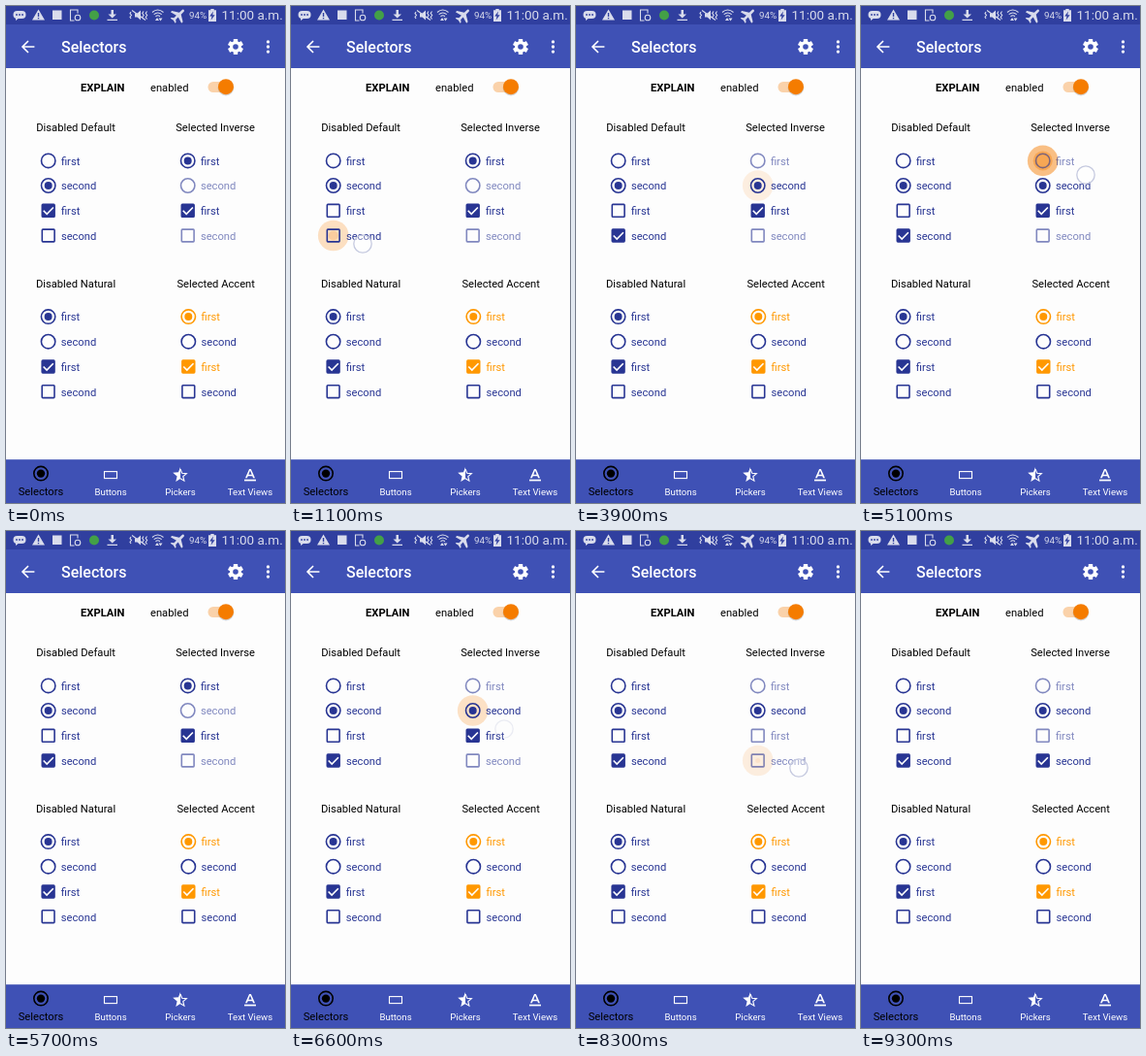
Write an HTML page that moves like this. It is 288 by 512 pixels and loops after 9400 ms.

```html
<!DOCTYPE html>
<html lang="en">
<head>
<meta charset="utf-8">
<title>Selectors</title>
<style>
  html, body { margin: 0; height: 100%; overflow: hidden; background: #fdfdfd; }
  svg { display: block; width: 100vw; height: 100vh; font: 11.2px Roboto, sans-serif; }
  .line { fill: none; stroke: currentColor; stroke-width: 1.6; }
  .thin { stroke-width: 1.1; }
  .solid { fill: currentColor; }
  .mid { text-anchor: middle; }
  .white { color: #fff; fill: #fff; }
  .status { color: #d9dcec; fill: #d9dcec; }
  .tab { font-size: 9.6px; text-anchor: middle; }
</style>
</head>
<body>
<svg viewBox="0 0 288 512">
  <rect width="288" height="512" fill="#fdfdfd"/>
  <rect width="288" height="64" fill="#3f51b5"/>
  <rect width="288" height="19" fill="#303f9f"/>
  <rect y="467.200" width="288" height="44.800" fill="#3f51b5"/>

  <g class="status">
    <rect x="7.500" y="5" width="13" height="8" rx="4"/>
    <path d="M10 12v3l4-3zM33.500 3.500L40 14.500H27z"/>
    <g fill="#303f9f">
      <circle cx="11" cy="9" r=".9"/><circle cx="14" cy="9" r=".9"/><circle cx="17" cy="9" r=".9"/>
      <path d="M32.800 7h1.400v4h-1.400zM32.800 12h1.400v1.300h-1.400z"/>
    </g>
    <rect x="48" y="4.500" width="9.500" height="9.500"/>
    <path class="line thin" d="M74 7.500V4h-7.500v11h4"/>
    <circle class="line thin" cx="74" cy="12" r="2.800"/>
    <circle cx="91" cy="9.500" r="5" fill="#43a047"/>
    <path d="M108.500 4h2.500v4.500h3l-4.300 4-4.200-4h3zM104.500 13.700h10.500v1.300h-10.500z"/>
    <path d="M133 7.500h2.500l3.500-3v10l-3.500-3H133z"/>
    <path class="line thin" d="M130 4.500l14 10M129 6l-1 1.700 1.500 1.800-1.500 1.700 1 1.800M142 5.500l-1.300 2 1.500 2-1.500 2 1.300 2M145.500 5.500l-1.300 2 1.500 2-1.500 2 1.300 2"/>
    <path class="line thin" d="M151 6.500q5.500-5 11.500 0M152.700 8.700q4-3.400 8 0M154.500 10.700q2.200-1.800 4.400 0"/>
    <path d="M154 15l2-3 2 3zM157.500 12.500h4l-2 3z"/>
    <path transform="translate(178 9.500) rotate(45)" d="M-1.300-7q1.300-2 2.600 0v4.500L8 1.500v2L1.300 1.700v3.500L3.500 7v1.200L0 7.300l-3.500.900V7l2.200-1.800V1.700L-8 3.500v-2l6.700-4z"/>
    <text x="189" y="13" font-size="9.800">94%</text>
    <path d="M211.300 3h3.400v1.300h2.300V16h-8V4.300h2.300z"/>
    <path fill="#303f9f" d="M214 5.500l-3.800 5h2.300l-.8 4 3.900-5.200h-2.400z"/>
    <text x="222.500" y="13.800" font-size="13.500">11:00 a.m.</text>
  </g>

  <g class="white">
    <path class="line" d="M29.400 42H17.500M23 36l-6 6 6 6"/>
    <text x="57" y="48" font-size="16" font-weight="500">Selectors</text>
    <g id="gear" transform="translate(237 42)"></g>
    <circle cx="270.500" cy="36.900" r="1.650"/><circle cx="270.500" cy="42" r="1.650"/><circle cx="270.500" cy="47.100" r="1.650"/>
  </g>

  <text x="77" y="88" font-weight="700">EXPLAIN</text>
  <text x="149" y="88">enabled</text>
  <rect x="208.500" y="78" width="25" height="11" rx="5.500" fill="#fad2aa"/>
  <circle cx="227" cy="84.200" r="8.300" fill="#000" opacity=".16"/>
  <circle cx="227" cy="83.200" r="8" fill="#f57c00"/>

  <circle class="line" cx="36" cy="481.600" r="7.200"/>
  <circle cx="36" cy="481.600" r="4.200"/>
  <text class="mid" x="36" y="503.700">Selectors</text>
  <g class="white tab">
    <rect class="line thin" x="101.500" y="479.600" width="13" height="7"/>
    <path class="line thin" d="M180 477l1.700 4.200 4.700.4-3.600 3 1.100 4.500L180 486.700"/>
    <path d="M180 475l-2 5.300-5.800.4 4.400 3.800-1.300 5.500 4.700-2.900z"/>
    <path fill-rule="evenodd" d="M251.100 477h1.800l4.100 9.300h-1.900l-.8-2h-4.600l-.8 2H247zM250.300 482.700h3.400l-1.700-4.200z"/>
    <path d="M246 487.700h12v1.700h-12z"/>
    <text x="108" y="503.700">Buttons</text>
    <text x="180" y="503.700">Pickers</text>
    <text x="252" y="503.700">Text Views</text>
  </g>

  <g id="ripples"></g>
  <g id="controls"></g>
  <g id="touches"></g>
</svg>
<script>
const LOOP = 9400, STEP = 100;
const NAVY = '#283593', ORANGE = '#ff9800';
const ROWS = [159.4, 185, 210.8, 236.5];
const LABELS = ['first', 'second', 'first', 'second'];
const GROUPS = [
  { title: 'Disabled Default', x: 43.7, dy: 0, on: [0, 1, 1, 0] },
  { title: 'Selected Inverse', x: 187.7, dy: 0, on: [1, 0, 1, 0], dim: 0.58 },
  { title: 'Disabled Natural', x: 43.6, dy: 160.7, on: [1, 0, 1, 0] },
  { title: 'Selected Accent', x: 188.3, dy: 160.7, on: [1, 0, 1, 0], accent: ORANGE }
];
const tap = (group, row, press, release, x, y) => ({ group, row, press, release, x, y });
const TAPS = [
  tap(0, 2, 200, 500, 72, 219),
  tap(0, 3, 900, 1200, 74, 245),
  tap(1, 1, 1500, 1800, 219, 198),
  tap(1, 0, 2600, 2900, 216.5, 172.5),
  tap(1, 1, 3000, 3600, 220, 191),
  tap(1, 0, 4700, 5200, 232, 174),
  tap(1, 1, 6100, 6400, 220, 204),
  tap(1, 2, 7000, 7300, 224, 219),
  tap(1, 3, 8200, 8500, 230, 244)
];
const byId = id => document.getElementById(id);

byId('gear').innerHTML = [0, 60, 120].map(a =>
  `<rect x="-2.200" y="-8" width="4.400" height="16" rx=".5" transform="rotate(${a})"/>`).join('') +
  '<circle r="6"/><circle r="2.800" fill="#3f51b5"/>';

function radio(x, y, on) {
  return `<circle class="line" cx="${x}" cy="${y}" r="7.200"/>` +
    (on ? `<circle class="solid" cx="${x}" cy="${y}" r="4"/>` : '');
}

function checkbox(x, y, on) {
  return `<rect class="line" x="${x - 6.4}" y="${y - 6.4}" width="12.800" height="12.800" rx=".8"
    ${on ? 'style="fill:currentColor"' : ''}/>` +
    (on ? `<path class="line" style="stroke:#fff" d="M${x - 5} ${y}l3.500 3.600 6.700-6.900"/>` : '');
}

function drawGroup({ title, x, dy, dim = 1, accent = NAVY }, on) {
  const rows = ROWS.map((row, i) => {
    const y = row + dy;
    const shape = (i < 2 ? radio : checkbox)(x, y, on[i]);
    return `<g color="${on[i] ? accent : NAVY}" opacity="${on[i] ? 1 : dim}">${shape}
      <text class="solid" x="${x + 13.2}" y="${y + 4.3}">${LABELS[i]}</text></g>`;
  });
  return `<text class="mid" x="${x + 28.4}" y="${129 + dy}">${title}</text>` + rows.join('');
}

function statesAt(t) {
  const states = GROUPS.map(g => [...g.on]);
  for (const { group, row, release } of TAPS) {
    if (t < release) continue;
    const on = states[group];
    if (row < 2) { on[row] = 1; on[1 - row] = 0; }
    else on[row] = 1 - on[row];
  }
  return states;
}

function drawRipple({ group, row, press, release }, t) {
  const held = t < release;
  const alpha = held ? Math.min(0.48, (t - press) / 100 * 0.12) : 0.45 * (1 - (t - release) / 400);
  if (alpha <= 0) return '';
  const centre = `cx="${GROUPS[group].x}" cy="${ROWS[row] + GROUPS[group].dy}" fill="#f57c00"`;
  const spot = held ? Math.min(10, (t - press) / 40) : 0;
  return `<circle ${centre} r="15.800" opacity="${alpha}"/><circle ${centre} r="${spot}" opacity="${alpha * 0.75}"/>`;
}

function drawTouch({ press, release, x, y }, t) {
  const alpha = t < press - 100 ? 0 : Math.min(1, 1 - (t - release) / 300);
  return alpha <= 0 ? '' : `<circle cx="${x}" cy="${y}" r="9.200" fill="#fff" fill-opacity=".35"
    stroke="#c5c9df" stroke-width="1.300" opacity="${alpha}"/>`;
}

let shown = -1;
function render(now) {
  const t = Math.floor(now % LOOP / STEP) * STEP;
  if (t !== shown) {
    shown = t;
    const states = statesAt(t);
    byId('ripples').innerHTML = TAPS.map(p => drawRipple(p, t)).join('');
    byId('controls').innerHTML = GROUPS.map((g, i) => drawGroup(g, states[i])).join('');
    byId('touches').innerHTML = TAPS.map(p => drawTouch(p, t)).join('');
  }
  requestAnimationFrame(render);
}
render(0);
</script>
</body>
</html>
```
